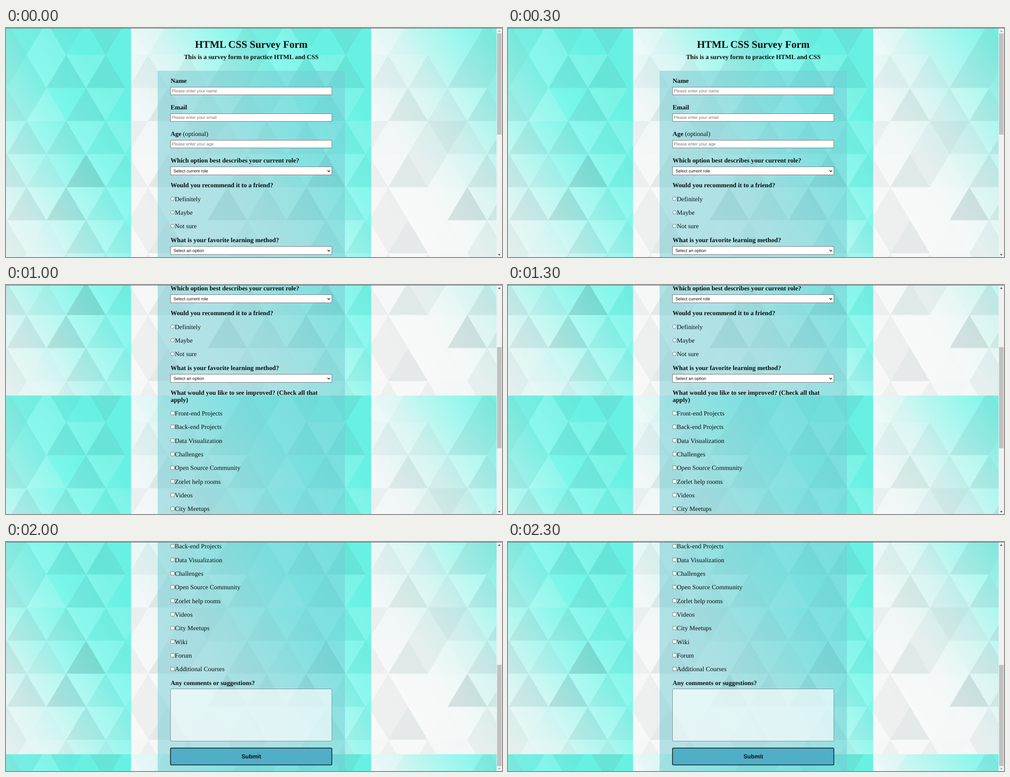
An HTML page for the animation above (2500 ms loop, 1099 by 509 pixels).

```html
<!DOCTYPE html>
<html lang="en">
<head>
<meta charset="utf-8">
<title>Survey form</title>
<style>
  html, body { margin: 0; width: 100%; height: 100%; overflow: hidden; background: #fff; }
  svg { display: block; width: 1099px; height: 509px; }
  text {
    font: 14.22px "Liberation Serif", "Times New Roman", serif;
    text-rendering: geometricPrecision;
    fill: #0a0f10;
    white-space: pre;
  }
  .b { font-weight: bold; }
  .h1 { font-size: 22.76px; font-weight: bold; text-anchor: middle; }
  .h2 { font-weight: bold; text-anchor: middle; }
  .ui { font: 9.48px "Liberation Sans", Arial, sans-serif; }
  .hint { fill: #757575; }
  .send { font: bold 12.8px "Liberation Sans", Arial, sans-serif; text-anchor: middle; }
  .field { fill: #fff; stroke: #767676; }
  .area { fill: #fff; fill-opacity: .66; stroke: #7d8c8e; }
  .button { fill: #50aec7; stroke: #0b1214; stroke-width: 1.5; }
  .chevron { fill: none; stroke: #111; stroke-width: 1.5; }

  #page, #thumb, #up, #down { animation: 2.5s step-end infinite; }
  #page { animation-name: page; }
  #thumb { animation-name: thumb; }
  #up { animation-name: up; }
  #down { animation-name: down; }
  @keyframes page {
    0% { transform: translateY(0); }
    20% { transform: translateY(-143px); }
    40% { transform: translateY(-287px); }
    60% { transform: translateY(-430px); }
    80%, 100% { transform: translateY(-593px); }
  }
  @keyframes thumb {
    0% { transform: translateY(0); }
    20% { transform: translateY(63px); }
    40% { transform: translateY(126px); }
    60% { transform: translateY(189px); }
    80%, 100% { transform: translateY(261px); }
  }
  @keyframes up { 0% { fill: #a3a3a3; } 20%, 100% { fill: #505050; } }
  @keyframes down { 0% { fill: #505050; } 80%, 100% { fill: #a3a3a3; } }
</style>
</head>
<body>
<svg viewBox="0 0 1099 509" xmlns="http://www.w3.org/2000/svg">
  <defs>
    <linearGradient id="wash" gradientUnits="userSpaceOnUse" x1="60" y1="430" x2="490" y2="150">
      <stop offset="0" stop-color="#f8f7f7"/>
      <stop offset=".22" stop-color="#eff7f6"/>
      <stop offset=".42" stop-color="#d6f5f2"/>
      <stop offset=".6" stop-color="#a8f7ef"/>
      <stop offset=".8" stop-color="#7af6ea"/>
      <stop offset="1" stop-color="#68f1e3"/>
    </linearGradient>
    <pattern id="tile" patternUnits="userSpaceOnUse" x="277" y=".7" width="532" height="532">
      <rect width="532" height="532" fill="url(#wash)"/>
      <g id="facets"></g>
    </pattern>
  </defs>
  <g id="page">
    <rect width="1087" height="1102" fill="url(#tile)"/>
    <rect x="336" y="95" width="415" height="1007" fill="#78ced6" fill-opacity=".53"/>
    <g id="form"></g>
  </g>
  <rect x="1087" width="12" height="509" fill="#f1f1f1"/>
  <rect id="thumb" x="1088" y="12" width="10" height="225" fill="#c1c1c1"/>
  <path id="up" d="M1090 8.5h6l-3-3.5z"/>
  <path id="down" d="M1090 502.5h6l-3 3.5z"/>
  <rect width="1099" height="1" fill="#5f6666"/>
</svg>
<script>
  const NS = "http://www.w3.org/2000/svg";
  const facets = document.getElementById("facets");
  const form = document.getElementById("form");

  function add(parent, tag, attrs, content) {
    const el = document.createElementNS(NS, tag);
    for (const key in attrs) el.setAttribute(key, attrs[key]);
    if (content) el.textContent = content;
    parent.appendChild(el);
    return el;
  }

  // Shade of each triangle, row by row: below zero darker, above zero lighter.
  const shades = [
    [3, 2, 0, 0, 0, 0, -2, -1, 1, -1, 0, -2, 0, 0],
    [1, -1, 1, -1, 0, -2, -2, -1, 1, -2, 1, -2, 0, 0],
    [1, 0, -2, 0, -1, 1, -2, -1, 1, 0, -2, 1, 0, 0],
    [-1, 0, 0, -1, -2, -1, 0, -2, 0, -2, 1, -1, 1, 0],
    [-1, 1, -2, -1, 1, 0, -2, 0, -1, 0, -4, 1, -1, 0],
    [0, -1, 2, 2, 2, -3, 0, -2, 1, -3, 1, -1, 1, 0],
    [1, -1, -2, 2, 1, 2, -1, 1, 0, 1, -2, 1, -1, 0],
    [0, -1, 1, -1, 0, 1, -1, 0, 1, -1, 0, -1, 0, 0]
  ];
  const half = 43.8, rise = 73.5;
  shades.forEach((row, r) => row.forEach((shade, i) => {
    if (!shade) return;
    const x = 38 + half * (i - 1), top = -14.5 + rise * r;
    const pointsUp = (i + r) % 2 === 0;
    const tip = pointsUp ? top : top + rise;
    const base = pointsUp ? top + rise : top;
    add(facets, "path", {
      d: `M${x} ${tip}L${x + half} ${base}H${x - half}z`,
      fill: shade < 0 ? "#4a7674" : "#fff",
      "fill-opacity": Math.abs(shade) * (shade < 0 ? .055 : .12)
    });
  }));

  const LEFT = 364.8;
  const text = (x, y, cls, s) => add(form, "text", { x, y, class: cls }, s);
  const label = (y, s) => text(LEFT, y + 4.7, "b", s);
  const box = (y, h, cls, rx) =>
    add(form, "rect", { x: 364.5, y, width: 357.5, height: h, rx, class: cls });

  function input(y, hint) {
    box(y - 8, 17, "field", 0);
    text(367.3, y + 3.3, "ui hint", hint);
  }
  function select(y, s) {
    box(y - 9, 18, "field", 0);
    text(371, y + 3.2, "ui", s);
    add(form, "path", { d: `M712.4 ${y - 1}l2.8 2.8l2.8 -2.8`, class: "chevron" });
  }
  function radio(y, s) {
    add(form, "circle", { cx: 368.9, cy: y - .5, r: 4, class: "field" });
    text(374, y + 4.7, "", s);
  }
  function check(y, s) {
    add(form, "rect", { x: 365, y: y - 4.4, width: 8, height: 8, rx: 1, class: "field" });
    text(374, y + 4.7, "", s);
  }

  text(543.5, 43.5, "h1", "HTML CSS Survey Form");
  text(543.5, 68.7, "h2", "This is a survey form to practice HTML and CSS");

  label(117, "Name");
  input(139.5, "Please enter your name");
  label(176, "Email");
  input(198.5, "Please enter your email");
  const age = label(235, "Age");
  add(age, "tspan", { "font-weight": "normal" }, " (optional)");
  input(257.5, "Please enter your age");

  label(294, "Which option best describes your current role?");
  select(317.5, "Select current role");

  const STEP = 30.33;
  label(349.5, "Would you recommend it to a friend?");
  ["Definitely", "Maybe", "Not sure"].forEach((s, i) => radio(380 + STEP * i, s));

  label(471, "What is your favorite learning method?");
  select(494.5, "Select an option");

  label(526, "What would you like to see improved? (Check all that");
  label(542, "apply)");
  ["Front-end Projects", "Back-end Projects", "Data Visualization", "Challenges",
   "Open Source Community", "Zorlet help rooms", "Videos", "City Meetups", "Wiki",
   "Forum", "Additional Courses"].forEach((s, i) => check(572.3 + STEP * i, s));

  label(906, "Any comments or suggestions?");
  box(919.5, 116, "area", 1.5);
  box(1051, 37.5, "button", 2);
  text(543.5, 1073.6, "send", "Submit");
</script>
</body>
</html>
```
